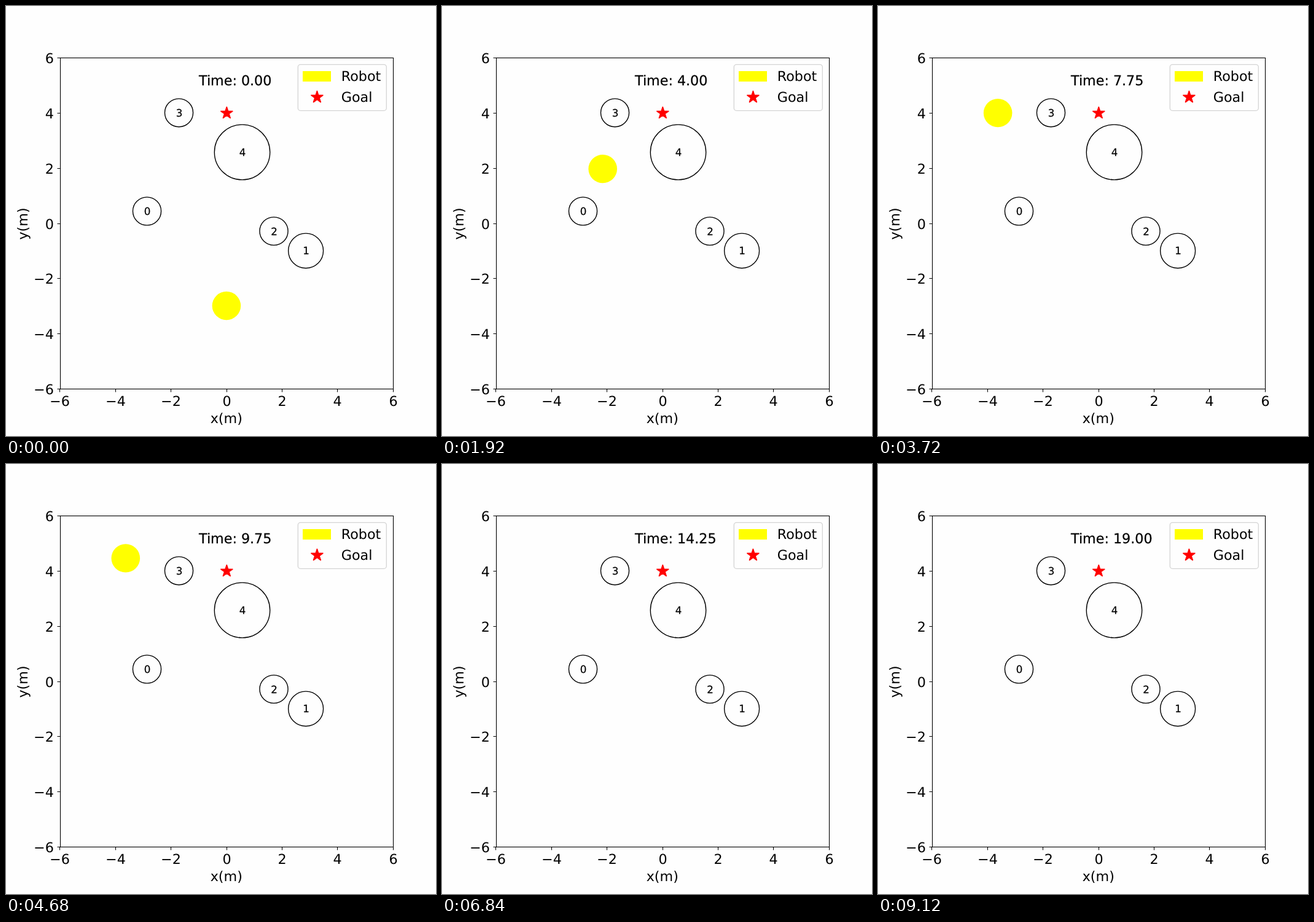
Animation, 700 px wide and 700 px high, one loop 9240 ms. Source, as an HTML page:

```html
<!DOCTYPE html>
<html lang="en">
<head>
<meta charset="utf-8">
<title>Robot navigation</title>
<style>
  html, body { margin: 0; width: 100%; height: 100%; overflow: hidden; background: #fefefe; }
  svg { display: block; width: 100vw; height: 100vh; }
  text { font: 22.22px "DejaVu Sans", sans-serif; text-rendering: geometricPrecision; }
  .heavy { stroke: #000; stroke-width: .25; }
  .label { font-size: 16.67px; text-anchor: middle; }
  .mid { text-anchor: middle; }
  .end { text-anchor: end; }
  .axis { fill: none; stroke: #000; stroke-width: 1.1; }
  .obstacle { fill: none; stroke: #000; stroke-width: 1.39; }
  .star { fill: red; stroke: red; stroke-width: 1.39; stroke-linejoin: bevel; }
</style>
</head>
<body>
<svg id="stage" viewBox="0 0 700 700">
  <clipPath id="plot"><rect x="88" y="84.5" width="542.5" height="539"/></clipPath>
  <g clip-path="url(#plot)"><ellipse id="robot" rx="23.3" ry="23.15" fill="#ff0"/></g>
</svg>
<script>
const STEP_MS = 120, STEPS = 77, STEP_SECONDS = 0.25;
const stage = document.getElementById("stage");
const robot = document.getElementById("robot");

function add(tag, attrs, content = "") {
  const node = document.createElementNS("http://www.w3.org/2000/svg", tag);
  for (const key in attrs) node.setAttribute(key, attrs[key]);
  node.textContent = content;
  return stage.appendChild(node);
}
const write = (x, y, content, cls = "") => add("text", { x, y, class: cls }, content);

function star(cx, cy) {
  const points = Array.from({ length: 10 }, (_, i) => {
    const r = i % 2 ? 3.98 : 10.42, a = i * Math.PI / 5;
    return [cx + r * Math.sin(a), cy - r * Math.cos(a)];
  });
  add("polygon", { points: points.join(" "), class: "star" });
}

// Obstacles: centre in pixels, radius in metres
[[229.5, 334, .51], [488.1, 398.4, .63], [436, 366.5, .51], [281.5, 173.8, .51], [384.5, 238, 1]]
  .forEach(([cx, cy, r], i) => {
    add("ellipse", { cx, cy, rx: r * 45.2, ry: r * 44.9, class: "obstacle" });
    write(cx + .5, Math.round(cy) + 6, i, "label heavy");
  });
star(359.3, 174.3);

// Axes
add("rect", { x: 88.5, y: 84.5, width: 542, height: 539, class: "axis" });
for (let v = -6; v <= 6; v += 2) {
  const name = String(v).replace("-", "\u2212");
  const x = Math.floor(359 + v * 45.2) + .5, y = Math.floor(354 - v * 44.92) + .5;
  add("path", { d: `M${x} 623.5v5M88.5 ${y}h-5`, class: "axis" });
  write(x, 651, name, "mid");
  write(77.8, y + 8.3, name, "end");
}
write(358.8, 679.3, "x(m)", "mid");
add("text", { transform: "translate(34.7 354.5) rotate(-90)", class: "mid" }, "y(m)");

// Legend
add("rect", { x: 475.3, y: 95.3, width: 144, height: 75, rx: 4, fill: "#fefefe", stroke: "#d4d4d4", "stroke-width": 1.3 });
add("rect", { x: 483, y: 106, width: 46, height: 17, fill: "#ff0" });
star(506.4, 148.4);
write(545.8, 122, "Robot");
write(545.8, 156, "Goal");

const clock = write(314, 129, "", "heavy");

// Robot path: step, x, y, joined by a smooth cubic curve
const path = [
  [0, 358.9, 488], [8, 354.2, 372.3], [9, 355, 352.8], [16, 261.7, 265.2],
  [23, 196.7, 198], [24, 196.6, 195.2], [32, 195, 171.2], [39, 194.8, 153.4],
  [40, 194.5, 149.2], [48, 191.7, 115.4], [51, 188.8, 103.6], [56, 197, 67], [64, 215, 20]
];
const slope = (i, k) => (path[i + 1][k] - path[i][k]) / (path[i + 1][0] - path[i][0]);

function tangent(i, k) {
  const last = path.length - 1;
  if (i === 0) return 2 * slope(0, k) - tangent(1, k);
  if (i === last) return slope(last - 1, k);
  const before = path[i][0] - path[i - 1][0], after = path[i + 1][0] - path[i][0];
  return (after * slope(i - 1, k) + before * slope(i, k)) / (before + after);
}

function position(step, k) {
  const end = path.findIndex(p => p[0] > step);
  if (end < 0) return path[path.length - 1][k];
  const a = path[end - 1], b = path[end], h = b[0] - a[0];
  const u = (step - a[0]) / h, w = 1 - u;
  return w * w * (1 + 2 * u) * a[k] + u * u * (3 - 2 * u) * b[k]
    + h * u * w * (w * tangent(end - 1, k) - u * tangent(end, k));
}

function draw() {
  const step = Math.floor(performance.now() / STEP_MS) % STEPS;
  robot.setAttribute("cx", position(step, 1));
  robot.setAttribute("cy", position(step, 2));
  clock.textContent = "Time: " + (step * STEP_SECONDS).toFixed(2);
  requestAnimationFrame(draw);
}
draw();
</script>
</body>
</html>
```
